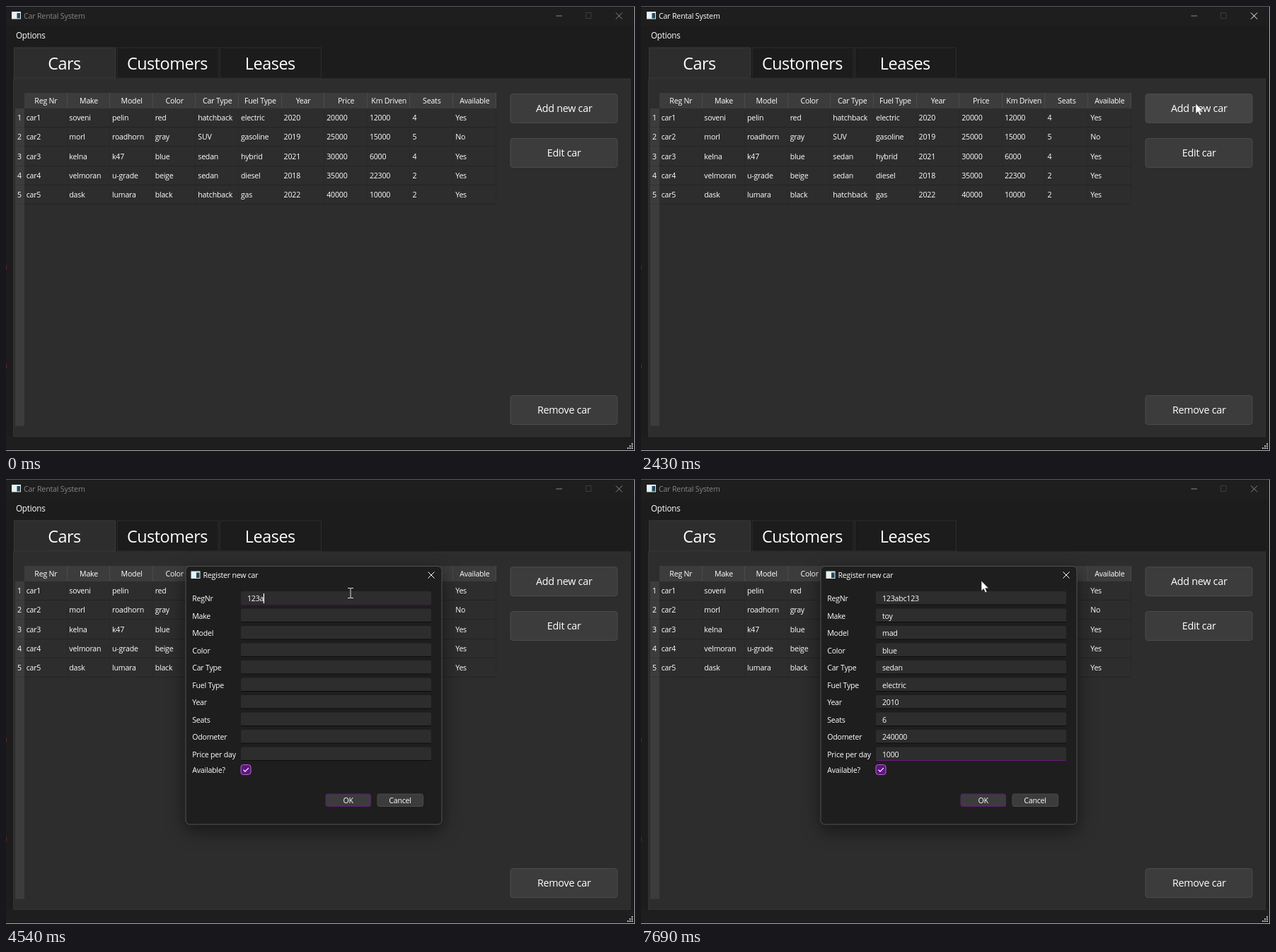
An HTML page for the animation above (8000 ms loop, 889x630 px).

```html
<!DOCTYPE html>
<html lang="en">
<head>
<meta charset="utf-8">
<title>Car Rental System</title>
<style>
html, body { margin: 0; width: 100%; height: 100%; overflow: hidden; background: #1e1e1e; }
svg { display: block; }
text { font: 10.6px "Open Sans", "Noto Sans", sans-serif; letter-spacing: -.02em; fill: #fff; white-space: pre; }
.mid { text-anchor: middle; }
#panel { filter: drop-shadow(0 8px 12px rgba(0, 0, 0, .5)); }
</style>
</head>
<body>
<svg id="stage" width="889" height="630" viewBox="0 0 889 630"></svg>
<script>
const LOOP = 8000;
const $ = id => document.getElementById(id);

// Markup helpers
const rect = (x, y, w, h, fill, extra = '') =>
  `<rect x="${x}" y="${y}" width="${w}" height="${h}" fill="${fill}" ${extra}/>`;
const text = (x, y, str, extra = '') => `<text x="${x}" y="${y}" ${extra}>${str}</text>`;
const label = (x, y, str, size = 10.6) => text(x, y, str, `class="mid" style="font-size:${size}px"`);
const line = (d, color, extra = '') => `<path d="${d}" fill="none" stroke="${color}" ${extra}/>`;
const icon = (x, y) => rect(x, y, 13, 10.5, '#e8e8e8') +
  rect(x + 1, y + 1.5, 6.5, 8, '#e4f3f6') + rect(x + 7.5, y + 2, 4.5, 7.5, '#1f4a5c');
const button = (y, str, id) =>
  rect(713, y + .5, 151, 41, '#3c3c3c', `id="${id}" rx="3.5" stroke="#4b4b4b"`) +
  label(788.7, y + 26, str, 14.4);

const headers = ['Reg Nr', 'Make', 'Model', 'Color', 'Car Type', 'Fuel Type', 'Year',
  'Price', 'Km Driven', 'Seats', 'Available'];
const cars = [
  'car1 soveni pelin red hatchback electric 2020 20000 12000 4 Yes',
  'car2 morl roadhorn gray SUV gasoline 2019 25000 15000 5 No',
  'car3 kelna k47 blue sedan hybrid 2021 30000 6000 4 Yes',
  'car4 velmoran u-grade beige sedan diesel 2018 35000 22300 2 Yes',
  'car5 dask lumara black hatchback gas 2022 40000 10000 2 Yes'
].map(row => row.split(' '));
const fields = ['RegNr', 'Make', 'Model', 'Color', 'Car Type', 'Fuel Type', 'Year',
  'Seats', 'Odometer', 'Price per day'];
const filled = ['123abc123', 'toy', 'mad', 'blue', 'sedan', 'electric', '2010', '6', '240000', ''];

function mainWindow() {
  let s = rect(0, 0, 889, 630, '#1e1e1e') + rect(0, 28, 887, 581, '#1c1c1c') +
    line('M0 .5H889', '#55595d') + line('M0 629.5H889M888.5 1V629', '#a8a8a8') +
    rect(0, 367, 1, 6, '#5a2825') + rect(0, 507, 1, 6, '#5a2825') +
    icon(8, 8) + text(25, 17.5, 'Car Rental System', 'id="title" style="font-size:10.7px"') +
    line('M777.5 14H786', '#8a8a8a') + line('M819.5 9.5h7.5v8h-7.5z', '#3d3d3d') +
    line('M862 9.5l9 9m0-9l-9 9', '#8a8a8a', 'id="close"') +
    text(14, 46, 'Options', 'style="font-size:11.7px"') +
    rect(10.5, 103, 872, 506.5, '#2d2d2d', 'stroke="#333"');
  ['Cars', 'Customers', 'Leases'].forEach((name, i) => {
    s += rect(11.5 + 145.5 * i, 59, 143, 43, i ? '#1c1c1c' : '#2d2d2d', `stroke="${i ? '#2d2d2d' : '#3a3a3a'}"`) +
      label(82.5 + 145.4 * i, 90, name, 23.4);
  });
  // Table
  s += rect(13, 145, 13, 449.5, '#3c3c3c') + rect(26, 123, 666.5, 22, '#3c3c3c');
  headers.forEach((name, i) => {
    const x = 26 + 60.6 * i, edge = Math.round(x + 60.6) - .5;
    s += line(`M${edge} 123V145`, '#4a4a4a') + line(`M${edge} 145V280`, '#292929') +
      label(x + 30.4, 138, name);
  });
  cars.forEach((row, r) => {
    const y = 27.25 * r, edge = 171.5 + Math.round(y);
    s += line(`M26 ${edge}H692`, '#232323') + line(`M13 ${edge}H26`, '#343434') + label(19, 162 + y, r + 1);
    row.forEach((cell, c) => s += text(28.7 + 60.65 * c, 162 + y, cell));
  });
  s += button(124, 'Add new car', 'add') + button(187, 'Edit car', 'edit') + button(551, 'Remove car', 'remove');
  for (let i = 0; i < 3; i++)
    for (let j = 0; j <= i; j++) s += rect(884 - 3 * j, 619 + 3 * i, 2, 2, '#b5b5b5');
  return s;
}

function dialog() {
  let s = rect(254, 123.5, 362, 365.5, '#1e1e1e', 'id="panel" rx="6" stroke="#535353"') +
    icon(261.5, 130.5) + text(278.5, 140, 'Register new car') + line('M596.5 131.5l9 9m0-9l-9 9', '#fff');
  fields.forEach((name, i) => {
    const y = 24.5 * i;
    s += text(263.2, 173 + y, name) + rect(332, 159 + y, 269, 19, '#2d2d2d', 'rx="2"') +
      line(`M332.5 ${178 + y}H600.5`, '#0c0c0c', `id="under${i}"`) + text(341, 173 + y, '', `id="value${i}"`);
  });
  return s + rect(0, 0, 1.2, 14, '#fff', 'id="caret"') +
    text(263.2, 415.7, 'Available?') +
    rect(332, 404.5, 14, 14, '#5f1580', 'rx="3.5" stroke="#b565d0"') +
    line('M335.5 411.7l2.4 2.4l5-5', '#fff', 'stroke-width="1.2"') +
    rect(452, 446, 63.5, 17.5, '#3c3c3c', 'rx="2.5" stroke="#5c2070"') + label(483.7, 459, 'OK') +
    rect(525, 446, 64.5, 17.5, '#3c3c3c', 'rx="2.5" stroke="#4a4a4a"') + label(557, 459, 'Cancel');
}

$('stage').innerHTML = mainWindow() + `<g id="dialog">${dialog()}</g>
  <path id="arrow" d="M0 0V14.6L3.3 11.6L5.6 16.8L7.9 15.8L5.7 10.7H10.3Z" fill="#fff" stroke="#222" stroke-width=".6"/>
  <path id="beam" d="M-4 -6.5H-1Q0 -6.5 0 -5.5Q0 -6.5 1 -6.5H4M0 -5.5V6.5M-4 7.5H-1Q0 7.5 0 6.5Q0 7.5 1 7.5H4" fill="none" stroke="#ddd"/>`;

// Each entry holds from its time until the next one
const pointer = [
  [0, -50, -50], [330, 775, 560], [480, 745, 430], [630, 713, 301], [1080, 570, 258], [1230, 464, 246],
  [1680, 530, 222], [1830, 640, 180], [1980, 745, 148], [2130, 777, 141], [2280, 784, 138],
  [2740, 735, 142], [2890, 670, 148], [3040, 600, 154], [3190, 545, 158], [3340, 510, 160], [3490, 493, 161],
  [3640, 487, 161], [6340, 481, 144]
];
const regText = [[0, ''], [3790, '1'], [3940, '12'], [4090, '123'], [4540, '123a'], [5140, '123ab'],
  [5290, '123abc'], [5890, '123abc1'], [6040, '123abc12'], [6190, '123abc123']];
const priceText = [[0, ''], [6790, '1'], [6940, '10'], [7090, '1000']];
const at = (keys, t) => keys.findLast(key => key[0] <= t);
const show = (id, on) => $(id).setAttribute('visibility', on ? 'visible' : 'hidden');

function draw(t) {
  const [, x, y] = at(pointer, t);
  const beam = t >= 3190 && t < 6340;
  show('arrow', !beam);
  show('beam', beam);
  $(beam ? 'beam' : 'arrow').setAttribute('transform', `translate(${x} ${y})`);

  const active = t >= 2280 && t < 2590;
  $('title').style.fill = active ? '#fff' : '#858585';
  $('close').style.stroke = active ? '#fff' : '#8a8a8a';
  $('add').style.fill = t >= 1980 && t < 2280 ? '#939393' : active ? '#444' : '#3c3c3c';
  $('remove').style.fill = t >= 330 && t < 480 ? '#939393' : '#3c3c3c';

  const open = t >= 2590, done = t >= 6340;
  $('dialog').setAttribute('display', open ? 'inline' : 'none');
  show('caret', false);
  if (!open) return;
  $('dialog').setAttribute('transform', t < 2740 ? 'translate(.87 .61) scale(.998)' : '');

  const focus = done ? 9 : t >= 3640 ? 0 : -1;
  fields.forEach((_, i) => {
    $('value' + i).textContent = i == 9 ? at(priceText, t)[1] : i == 0 ? at(regText, t)[1] : done ? filled[i] : '';
    $('under' + i).style.stroke = i != focus ? '#0c0c0c' : done ? '#6b1a80' : '#3d1a48';
  });
  if (focus < 0) return;
  const value = $('value' + focus);
  const width = value.textContent ? value.getComputedTextLength() : 0;
  $('caret').setAttribute('x', 340.6 + width);
  $('caret').setAttribute('y', 162 + 24.5 * focus);
  show('caret', t < 7690);
}

const start = performance.now();
function tick() {
  draw((performance.now() - start) % LOOP);
  requestAnimationFrame(tick);
}
tick();
</script>
</body>
</html>
```
